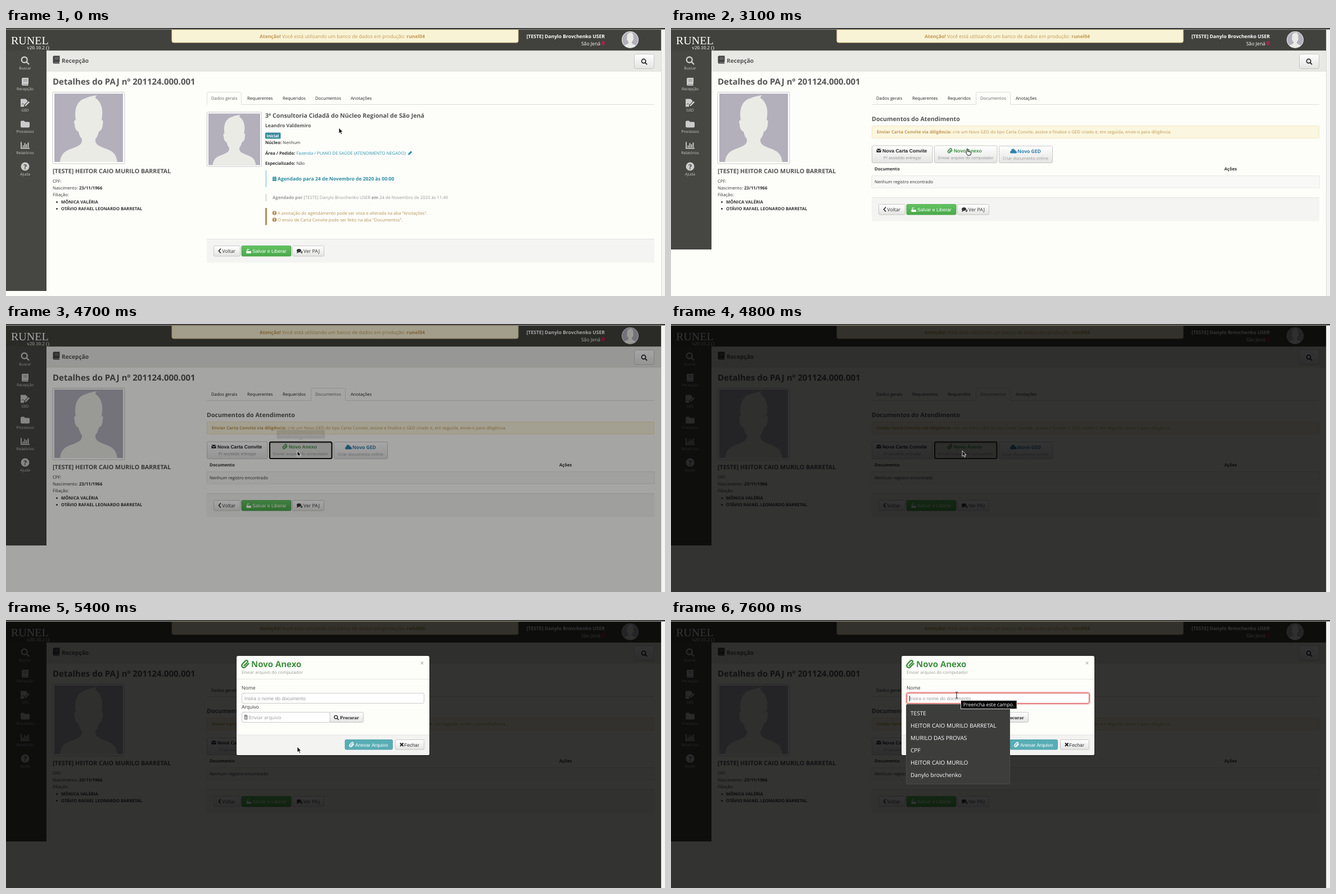
An HTML page that plays this animation: 1172 by 478 pixels, repeating every 8 s.

```html
<!DOCTYPE html>
<html lang="pt">
<head>
<meta charset="utf-8">
<title>Recepção</title>
<style>
html, body { margin: 0; width: 100%; height: 100%; overflow: hidden; background: #fdfdfa; }
svg { display: block; }
text { font: 7.7px "Open Sans", "Noto Sans", sans-serif; fill: #333; text-rendering: geometricPrecision; }
.m { font-size: 8.6px; }
.l { font-size: 10.7px; }
.xl { font-size: 15px; }
.sub { font-size: 7.35px; fill: #999; }
.b { font-weight: 700; }
.arial { font-family: "Liberation Sans", Arial, sans-serif; }
.serif { font-family: "Liberation Serif", Times, serif; }
.head { fill: #555; font-weight: 700; }
.white { fill: #fff; }
.grey { fill: #999; }
.gold { fill: #c09853; }
.teal { fill: #2a93ab; }
.green { fill: #3f8f3f; }
.mid { text-anchor: middle; }
.end { text-anchor: end; }
.side text { font-size: 6.7px; fill: #ccc; text-anchor: middle; }
.side use { color: #ccc; }
.btn { fill: url(#btn); stroke: #bbb; stroke-width: .8; }
.line { fill: none; stroke: #ddd; }
.field { fill: #fff; stroke: #ccc; }
#list text { font-size: 10.1px; font-weight: 500; fill: #fff; }
</style>
</head>
<body>
<svg width="1172" height="478" viewBox="0 0 1172 478">
<defs>
  <linearGradient id="btn" x2="0" y2="1"><stop stop-color="#fff"/><stop offset="1" stop-color="#e4e4e3"/></linearGradient>
  <linearGradient id="go" x2="0" y2="1"><stop stop-color="#62c462"/><stop offset="1" stop-color="#4aa84a"/></linearGradient>
  <clipPath id="round"><circle cx="61" cy="61" r="61"/></clipPath>
  <g id="person">
    <path fill="#b3b0bc" d="M0 0h122v122H0z"/>
    <path fill="#ebebe6" d="M10 122C12 105 22 101 34 97C44 93 50 90 49 81C46 78 44 73 43 68C38 66 36 60 36 54C34 50 36 47 38 47C35 28 40 12 56 8C62 5 70 4 76 3C72 6 73 8 73 8C83 14 88 28 84 47C87 47 87 51 86 54C86 60 84 66 79 68C78 73 76 78 73 81C72 90 78 93 88 97C100 101 110 105 112 122z"/>
  </g>
  <g id="search" fill="none" stroke="currentColor" stroke-width="2.4"><circle cx="-1.3" cy="-1.3" r="5"/><path d="M2.4 2.4L7 7"/></g>
  <g id="book"><path fill="currentColor" d="M-4-7H6V4H5V6H6V7H-4Q-6 7-6 5V-5Q-6-7-4-7z"/><path stroke="#888" d="M-3-3.5H4M-3-1H4M-4 5H4"/></g>
  <g id="sign" fill="currentColor"><path d="M-8-7H1L4-4V-2L-2 4V7H-8z"/><path d="M-1 5L6-3L8-1L1 6z"/><path fill="none" stroke="#444" d="M-6 3l2-2 2 2"/></g>
  <path id="folder" fill="currentColor" d="M-8-4Q-8-6-6-6H-2L0-4H6Q8-4 8-2V4Q8 6 6 6H-6Q-8 6-8 4z"/>
  <path id="chart" fill="none" stroke="currentColor" stroke-width="1.8" d="M-7-6V5.500H8M-3.500 4V0M-.5 4V-4M2.500 4V-2M5.500 4V-5"/>
  <g id="help"><circle r="7.500" fill="currentColor"/><text y="4.500" class="mid" style="font-size:12px;font-weight:700;fill:#444">?</text></g>
  <path id="clip" fill="none" stroke="currentColor" stroke-width="1.5" stroke-linecap="round" d="M-1.500 1.500L2-2Q3-3.200 2-4T0-4L-3.500-.3Q-5 1.500-3.500 3T-.3 3L3.500-.8"/>
  <path id="unlock" fill="currentColor" fill-rule="evenodd" d="M-4.500 0H-3.500V-2Q-3.500-4-1.500-4T.5-2H-.7Q-.7-3-1.500-3T-2.300-2V0H4V4H-4.500z"/>
  <g id="chat" fill="currentColor"><ellipse cx="-1" cy="-1" rx="4" ry="3"/><path d="M-4 1L-5 4L-1 2zM1 3Q4 2 4-1Q6 1 4.500 2.500L5 4z"/></g>
  <path id="cloud" fill="currentColor" d="M-4 4Q-6 4-6 2T-4-.5Q-4-4-.5-4Q2-4 2.500-1.500Q4-2 4.500 0Q6.500.5 6 2.500T4 4z"/>
  <g id="info"><circle r="3.800" fill="#b58c4d"/><path stroke="#fff" stroke-width="1.300" d="M0-2.500V.7M0 1.400V2.700"/></g>
</defs>

<rect width="1172" height="478" fill="#fdfdfa"/>
<path fill="#f4f4f2" d="M1165.500 0H1172V478H1165.500z"/>
<path stroke="#dcdcda" d="M1165.500 3V478"/>
<path fill="#41413d" d="M0 3H1165V40.500H0z"/>
<rect id="sidebar" y="40" width="72" fill="#464642"/>
<path fill="#e8e8e5" d="M72 40.500H1165V77H72z"/><path stroke="#d9d9d6" d="M72 77H1165"/>

<text x="9" y="28.500" class="serif white" style="font-size:20px">RUNEL</text>
<text x="77" y="37.500" class="serif white end" style="font-size:9px">v20.10.2 ()</text>
<path fill="#f9f3d6" stroke="#e5cf96" d="M295 3H911V23Q911 26 908 26H298Q295 26 295 23z"/>
<text x="598" y="17.500" class="m gold mid"><tspan class="b">Atenção!</tspan> Você está utilizando um banco de dados em produção: <tspan class="b">runel04</tspan></text>
<text x="1065" y="18" class="m b white end">[TESTE] Danylo Brovchenko USER</text>
<text x="1057" y="31" class="m white end">São Jená</text>
<path fill="#b8224f" d="M1062 32Q1059 28 1059 26.500A3 3 0 0 1 1065 26.500Q1065 28 1062 32z"/><circle cx="1062" cy="26.500" r="1.100" fill="#41413d"/>
<circle cx="1110" cy="21" r="15" fill="#eee"/>
<g transform="translate(1096 7) scale(.23)" clip-path="url(#round)"><use href="#person"/></g>

<g class="side" id="side"></g>

<use href="#book" transform="translate(89.500 56.500)" color="#444"/>
<text x="99" y="62" class="head" style="font-size:10.2px">Recepção</text>
<rect x="1117.500" y="46.500" width="35" height="26" rx="3" class="btn"/>
<use href="#search" transform="translate(1135 60) scale(.72)" color="#222"/>

<text x="83" y="101" class="xl head">Detalhes do PAJ nº 201124.000.001</text>
<rect x="83" y="114.500" width="128" height="127.500" rx="2" fill="#fff" stroke="#c8c8c8"/>
<use href="#person" transform="translate(86 117)"/>
<text x="83" y="259" class="l head">[TESTE] HEITOR CAIO MURILO BARRETAL</text>
<text x="83" y="276">CPF:</text>
<text x="83" y="288">Nascimento: <tspan class="b">23/11/1966</tspan></text>
<text x="83" y="300">Filiação:</text>
<circle cx="90.500" cy="310.500" r="1.300"/><circle cx="90.500" cy="322.500" r="1.300"/>
<text x="98" y="312.500" class="b">MÔNICA VALÉRIA</text>
<text x="98" y="324.500" class="b">OTÁVIO RAFAEL LEONARDO BARRETAL</text>

<path class="line" d="M357 136.500H1153"/>
<rect id="hover" x="542" y="114" width="62" height="22" rx="2" fill="#eee"/>
<path id="tab" fill="#fdfdfa" stroke="#ddd" d="M.5 137V116.500Q.5 114.500 2.500 114.500H59.500Q61.500 114.500 61.500 116.500V137"/>
<g id="tabs"></g>

<g id="general">
  <rect x="357.500" y="150" width="97" height="97" rx="2" fill="#fff" stroke="#c8c8c8"/>
  <use href="#person" transform="translate(360 152.500) scale(.754)"/>
  <text x="461" y="160" class="l head">3ª Consultoria Cidadã do Núcleo Regional de São Jená</text>
  <text x="461" y="177" class="m head">Leandro Valdemiro</text>
  <rect x="461" y="186.500" width="27.500" height="11" rx="1.500" fill="#3b8b9c"/>
  <text x="463.500" y="194.700" class="b white" style="font-size:7.2px">Inicial</text>
  <text x="461" y="207"><tspan class="b">Núcleo:</tspan> Nenhum</text>
  <text x="461" y="225.500"><tspan class="b">Área / Pedido:</tspan> <tspan class="teal">Fazenda / PLANO DE SAÚDE (ATENDIMENTO NEGADO)</tspan></text>
  <path fill="#2a93ab" d="M715 226.500L715.500 224L720 219.300L722.300 221.500L717.600 226z"/>
  <text x="461" y="244"><tspan class="b">Especializado:</tspan> Não</text>
  <path fill="#bfe4ec" d="M461 254H464V284H461z"/>
  <path fill="#2a8ba0" d="M474 266H481V273H474zM475.300 264.500H476.500V266H475.300zM478.500 264.500H479.700V266H478.500z"/>
  <path stroke="#cde6ea" stroke-width=".5" d="M474 267.500H481M474 270.300H481M476.300 267.500V273M478.700 267.500V273"/>
  <text x="483" y="272" class="m b" style="fill:#2a8ba0">Agendado para 24 de Novembro de 2020 às 00:00</text>
  <path fill="#e2e2e0" d="M461 296H464V309H461z"/>
  <text x="474" y="305" class="grey"><tspan class="b">Agendado por</tspan> [TESTE] Danylo Brovchenko USER <tspan class="b">em</tspan> 24 de Novembro de 2020 às 11:49</text>
  <path fill="#b58c4d" d="M461 321H464V351.500H461z"/>
  <use href="#info" x="477.500" y="330"/><use href="#info" x="477.500" y="342"/>
  <text x="483" y="332.500" style="fill:#b5924f">A anotação do agendamento pode ser vista e alterada na aba "Anotações".</text>
  <text x="483" y="344.700" style="fill:#b5924f">O envio de Carta Convite pode ser feito na aba "Documentos".</text>
</g>

<g id="docs">
  <text x="357" y="166" class="l head">Documentos do Atendimento</text>
  <rect x="357.500" y="174.500" width="795" height="22" rx="2" fill="#fbf6df" stroke="#f3e6c0"/>
  <text x="366" y="188" class="gold"><tspan class="b">Enviar Carta Convite via diligência:</tspan> crie um Novo GED do tipo Carta Convite, assine e finalize o GED criado e, em seguida, envie-o para diligência.</text>
  <rect x="357.500" y="210" width="107.500" height="30.500" rx="2" class="btn"/>
  <rect id="attach" x="468.500" y="210" width="111.500" height="30.500" rx="2" class="btn"/>
  <path id="pressed" fill="none" stroke="#000" stroke-opacity=".18" stroke-width="2" d="M469.500 240V211.500H579V240"/>
  <rect x="583.500" y="210.500" width="95" height="30" rx="2" class="btn"/>
  <path fill="#222" d="M365.500 215.500H373.500L369.500 219zM365.500 216.700L369.500 220.200L373.500 216.700V221.800H365.500z"/>
  <text x="376" y="222" class="m b arial" style="fill:#222">Nova Carta Convite</text>
  <text x="411.500" y="234.300" class="sub arial mid">P/ assistido entregar</text>
  <use href="#clip" x="496.500" y="219" color="#3f8f3f"/>
  <text x="503" y="222" class="m b arial green">Novo Anexo</text>
  <text x="524" y="234.300" class="sub arial mid">Enviar arquivo do computador</text>
  <use href="#cloud" x="609" y="219.500" color="#2f83ad"/>
  <text x="616" y="222.500" class="m b" style="fill:#2f83ad">Novo GED</text>
  <text x="630.500" y="234.500" class="sub mid">Criar documento online</text>
  <text x="362" y="254.300" class="b">Documento</text><text x="984" y="254.300" class="b">Ações</text>
  <path fill="#f8f8f6" stroke="#e2e2e0" stroke-width=".8" d="M357 263.500H1153V285H357z"/>
  <g id="loading">
    <circle id="spin" cx="367" cy="275" r="4" fill="none" stroke="#444" stroke-width="1.300" stroke-dasharray="3.600 2.683"/>
    <text x="374" y="277">Carregando...</text>
  </g>
  <text id="empty" x="362" y="277">Nenhum registro encontrado</text>
</g>

<g id="footer">
  <path fill="#f4f4f2" d="M357 376H1153V418.500H357z"/><path stroke="#e2e2e0" d="M357 376.500H1153"/>
  <rect x="369.500" y="388.500" width="47" height="18.500" rx="2" class="btn"/>
  <rect x="419" y="388.500" width="88" height="18.500" rx="2" fill="url(#go)" stroke="#48a048" stroke-width=".8"/>
  <rect x="509.500" y="388.500" width="56" height="18.500" rx="2" class="btn"/>
  <path fill="none" stroke="#333" stroke-width="1.700" d="M382 393.500L378.500 397.500L382 401.500"/>
  <text x="384.500" y="401" class="m">Voltar</text>
  <use href="#unlock" x="432" y="398" color="#fff"/>
  <text x="438" y="401" class="m arial white">Salvar e Liberar</text>
  <use href="#chat" x="522" y="398" color="#333"/>
  <text x="529" y="401" class="m">Ver PAJ</text>
</g>

<g id="tip">
  <path d="M483 189H565Q567 189 567 191V202.500Q567 204.500 565 204.500H527L524 207.500L521 204.500H483Q481.500 204.500 481.500 202.500V191Q481.500 189 483 189z"/>
  <text x="524" y="199.500" class="mid white" style="font-size:6.7px">Novo documento anexo</text>
</g>
<rect id="dim" y="3" width="1165" height="475"/>
<rect id="focus" x="469" y="210.500" width="110.500" height="29.500" rx="2.500" fill="none" stroke="#0a0a0a" stroke-width="2"/>
<path fill="#393937" d="M0 0H1172V2.500H0z"/>

<g id="modal">
  <rect x="409" y="63.500" width="345" height="179" rx="4" opacity=".3"/>
  <rect x="410" y="64" width="343" height="177" rx="3" fill="#fdfdfa"/>
  <path fill="#f3f3f1" d="M410 205H753V238Q753 241 750 241H413Q410 241 410 238z"/>
  <path stroke="#e4e4e2" d="M410 105.500H753M410 205H753"/>
  <use href="#clip" transform="translate(426 79) scale(1.600)" color="#3f8f3f"/>
  <text x="436" y="84" class="xl b green">Novo Anexo</text>
  <text x="419" y="96.300" class="grey">Enviar arquivo do computador</text>
  <text x="740" y="80.500" class="b mid" style="font-size:12px;fill:#bbb">×</text>
  <text x="419" y="124.300" class="m">Nome</text>
  <rect id="glow" x="418" y="129" width="327" height="21" rx="4" fill="none" stroke="#f0a5a3" stroke-width="2"/>
  <rect id="name" x="419.500" y="130.500" width="324" height="18" rx="2.500" class="field"/>
  <text x="424" y="143" class="m arial grey">Insira o nome do documento</text>
  <path id="caret" stroke="#222" d="M424.500 135V145"/>
  <text x="419" y="158" class="m">Arquivo</text>
  <rect x="419.500" y="164.500" width="157" height="18" rx="2.500" class="field"/>
  <path fill="#888" d="M424 169H428L429.500 170.500V177.500H424z"/><path stroke="#fff" d="M426.700 171V176M425 174L426.700 176L428.400 174"/>
  <text x="432" y="176.500" class="m grey">Enviar arquivo</text>
  <rect x="576" y="164.500" width="59.500" height="18" rx="2" class="btn"/>
  <use href="#search" transform="translate(587.500 174) scale(.58)" color="#222"/>
  <text x="594" y="176.500" class="m b serif" style="fill:#222">Procurar</text>
  <rect x="603" y="213.500" width="84.500" height="17.500" rx="2" fill="#58adb5" stroke="#4a9ba4" stroke-width=".8"/>
  <use href="#clip" x="615" y="222.500" color="#fff"/>
  <text x="621" y="225.700" class="m arial white">Anexar Arquivo</text>
  <rect x="692.500" y="213.500" width="51" height="17.500" rx="2" class="btn"/>
  <path stroke="#222" stroke-width="2" d="M701 219.500L706.500 225M706.500 219.500L701 225"/>
  <text x="708" y="225.700" class="m arial">Fechar</text>
</g>

<g id="list"><rect x="418.500" y="150.500" width="184" height="142" rx="2" fill="#3d3d3c" stroke="#4a4a49"/></g>
<g id="hint">
  <rect x="515.500" y="143.500" width="99.500" height="15" fill="#000" stroke="#ddd"/>
  <text x="565" y="153.800" class="mid white" style="font-size:8.8px">Preencha este campo.</text>
</g>

<g id="cursor" stroke-linejoin="round">
  <path d="M0 0V10L2.300 8L4 11.500L5.700 10.700L4.100 7.400H7z" fill="#111" stroke="#fff" stroke-width=".8"/>
  <path d="M-1 0Q0-1.300 1 0V4L6 5.300Q7 5.700 6.700 7.500L5.500 11H.5L-2.500 6.500Q-2.500 5-1 6z" fill="#fff" stroke="#111"/>
  <path d="M-2-5.500Q0-5.500 0-4.500Q0-5.500 2-5.500M0-4.500V4.500M-2 5.500Q0 5.500 0 4.500Q0 5.500 2 5.500" fill="none" stroke="#111"/>
</g>
</svg>
<script>
const $ = id => document.getElementById(id);
const set = (id, name, value) => $(id).setAttribute(name, value);
const show = (id, on) => set(id, "opacity", +on);
const LOOP = 8000, ARROW = 0, HAND = 1, BEAM = 2;

["search Buscar", "book Recepção", "sign GED", "folder Processos", "chart Relatórios", "help Ajuda"].forEach((item, i) => {
  const [icon, label] = item.split(" "), y = 58 + i * 37.8;
  $("side").innerHTML += `<use href="#${icon}" x="34" y="${y}"/><text x="34" y="${y + 15.5}">${label}</text>`;
});
[[365, "Dados gerais"], [429, "Requerentes"], [492, "Requeridos"], [550, "Documentos"], [613, "Anotações"]].forEach(([x, label]) => {
  $("tabs").innerHTML += `<text x="${x}" y="128">${label}</text>`;
});
["TESTE", "HEITOR CAIO MURILO BARRETAL", "MURILO DAS PROVAS", "CPF", "HEITOR CAIO MURILO", "Danylo brovchenko"].forEach((label, i) => {
  $("list").innerHTML += `<text x="426" y="${169.7 + i * 22}">${label}</text>`;
});

// Each step: start time, then the values held until the next step.
const cursorSteps = [
  [0, 592, 178, ARROW], [400, 588, 171, ARROW], [500, 586, 166, ARROW],
  [700, 582, 150, ARROW], [800, 577, 133, HAND], [900, 576, 127, HAND], [1500, 576, 127, ARROW],
  [2900, 568, 146, ARROW], [3000, 545, 188, ARROW], [3100, 527, 216, HAND], [3200, 519, 226, HAND],
  [4700, 518, 226, ARROW],
  [5700, 519, 222, ARROW], [5800, 520, 206, ARROW], [5900, 518, 186, ARROW], [6000, 514, 166, ARROW],
  [6100, 511, 150, ARROW], [6200, 509, 143, BEAM], [6300, 508, 140, BEAM], [6500, 508, 134, BEAM]
];
const tipSteps = [[0, 0], [3200, .4], [3300, .8], [4600, .36], [4700, .1], [4800, 0]];
const dimSteps = [[0, 0], [4700, .35], [4800, .8]];
const modalSteps = [[0, 0, 0], [4900, -40, .33], [5000, 30, .67], [5100, 59, 1], [5400, 64, 1]];
const at = (steps, t) => steps.findLast(s => s[0] <= t).slice(1);

function draw(t) {
  const docs = t >= 1500, focused = t >= 6500, shift = docs ? -74 : 0;
  show("general", !docs);
  show("docs", docs);
  set("sidebar", "height", 429 + shift);
  set("footer", "transform", `translate(0 ${shift})`);
  set("tab", "transform", `translate(${docs ? 542 : 357} 0)`);
  show("hover", t >= 800 && !docs);
  [...$("tabs").children].forEach((label, i) => label.style.fill = i === (docs ? 3 : 0) ? "#666" : "#222");

  show("loading", t < 2500);
  show("empty", t >= 2500);
  const turn = Math.floor((Math.min(Math.max(t, 1500), 2100) - 1500) / 100) * 18;
  set("spin", "transform", `rotate(${turn + 20} 367 275)`);

  $("attach").style.fill = t < 3200 ? "" : t < 4600 ? "#e6e6e5" : "#dededc";
  show("pressed", t >= 4600);
  show("tip", at(tipSteps, t)[0]);
  show("dim", at(dimSteps, t)[0]);
  show("focus", t >= 4700);

  const [top, alpha] = at(modalSteps, t);
  set("modal", "transform", `translate(0 ${top - 64})`);
  show("modal", alpha);
  show("glow", focused ? (t < 6800 ? .4 : .8) : 0);
  $("name").style.stroke = focused ? (t < 6800 ? "#dd9a98" : "#d9534f") : "";
  show("caret", focused && (t < 7200 || t >= 7600));
  show("list", focused);
  show("hint", t >= 7000);

  const [x, y, kind] = at(cursorSteps, t);
  set("cursor", "transform", `translate(${x} ${y})`);
  [...$("cursor").children].forEach((shape, i) => shape.setAttribute("opacity", +(i === kind)));
}

const start = performance.now();
function tick() {
  draw((performance.now() - start) % LOOP);
  requestAnimationFrame(tick);
}
tick();
</script>
</body>
</html>
```
